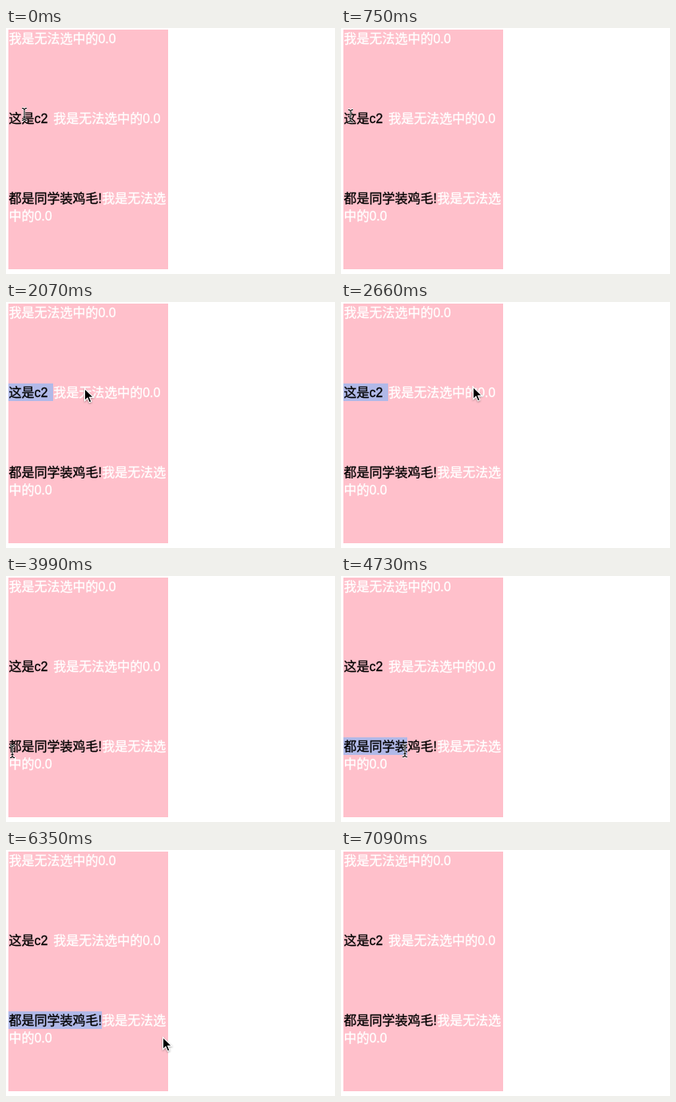
Recreate the animation shown at these times as an HTML page. Size 412 px wide and 308 px high, loop 7390 ms.

```html
<!DOCTYPE html>
<html lang="zh-CN">
<head>
<meta charset="utf-8">
<style>
html, body { margin: 0; width: 100%; height: 100%; overflow: hidden; background: #fff; }
svg { display: block; font: 16px "Liberation Sans", "Noto Sans CJK SC", "Noto Sans CJK", sans-serif; }
text { fill: #000; stroke: #000; stroke-width: .3px; }
.note { fill: #fff; stroke: #fff; }
</style>
</head>
<body>
<svg width="412" height="308" viewBox="0 0 412 308">
  <defs>
    <path id="beamShape" d="M-3-7.5h1.5L0-6l1.5-1.5H3M0-6V6M-3 7.5h1.5L0 6l1.5 1.5H3M-1.5 3.5h3"/>
  </defs>
  <rect x="3" y="2" width="200" height="300" fill="#ffc0cb"/>
  <rect id="selection" x="3" height="22" fill="#b1b9e8"/>
  <text class="note" x="3.4" y="19">我是无法选中的0.0</text>
  <text x="3.4" y="119">这是c2</text>
  <text class="note" x="59.2" y="119">我是无法选中的0.0</text>
  <text x="3.4" y="219">都是同学装鸡毛!</text>
  <text class="note" x="120.2" y="219">我是无法选</text>
  <text class="note" x="3.4" y="241">中的0.0</text>
  <g id="beam" fill="none">
    <use href="#beamShape" stroke="#fff" stroke-width="2.4"/>
    <use href="#beamShape" stroke="#000" stroke-width="1.1"/>
  </g>
  <path id="arrow" d="M.5.5v15.2l3.5-3.4 2.4 5.6 2.6-1.1-2.4-5.4h5z" stroke="#fff" stroke-width="1.1"
    style="filter: drop-shadow(0 1px 1px #0005)"/>
</svg>
<script>
const LOOP = 7390, STEPS = 50, GLYPH = 16, LEFT = 3;
const [selection, beam, arrow] = ["selection", "beam", "arrow"].map(id => document.getElementById(id));

// Pointer stops, joined by straight moves; the pointer rests for `hold` steps
const stops = [
  { at: 0, x: 23, y: 108 },
  { at: 7, x: 7, y: 111 },
  { at: 10, x: 31, y: 110 },
  { at: 18, x: 165, y: 106 },
  { at: 19, x: 177, y: 107, hold: 1 },
  { at: 24, x: 8, y: 220, hold: 3 },
  { at: 34, x: 109, y: 219 },
  { at: 36, x: 144, y: 210, hold: 1 },
  { at: 43, x: 196, y: 234 },
  { at: 45, x: 268, y: 257, hold: 1 },
  { at: 47, x: 354, y: 290 }
];
const hiddenFrom = 48;

// Selectable text, and the steps during which it is selected
const lines = [
  { top: 102, width: 56, from: 8, to: 21 },
  { top: 202, width: 117, from: 27, to: 45 }
];

function pointerAt(step) {
  const i = stops.findLastIndex(stop => stop.at <= step);
  const a = stops[i], b = stops[i + 1] ?? a;
  const start = a.at + (a.hold ?? 0);
  const k = step > start && b !== a ? (step - start) / (b.at - start) : 0;
  return [a.x + (b.x - a.x) * k, a.y + (b.y - a.y) * k].map(Math.round);
}

function draw(now) {
  const step = Math.floor((now % LOOP + 8) / LOOP * STEPS) % STEPS;
  const [x, y] = pointerAt(step);

  const line = lines.find(l => step >= l.from && step < l.to);
  const dragged = Math.round((x - LEFT) / GLYPH) * GLYPH;
  selection.setAttribute("y", line ? line.top : 0);
  selection.setAttribute("width", line ? Math.min(dragged, line.width) : 0);

  const overText = lines.some(l => x < LEFT + l.width && y >= l.top && y < l.top + 22);
  const cursor = overText ? beam : arrow;
  beam.style.display = arrow.style.display = "none";
  if (step < hiddenFrom) {
    cursor.style.display = "";
    cursor.setAttribute("transform", `translate(${x} ${y})`);
  }
  requestAnimationFrame(draw);
}
requestAnimationFrame(draw);
</script>
</body>
</html>
```
